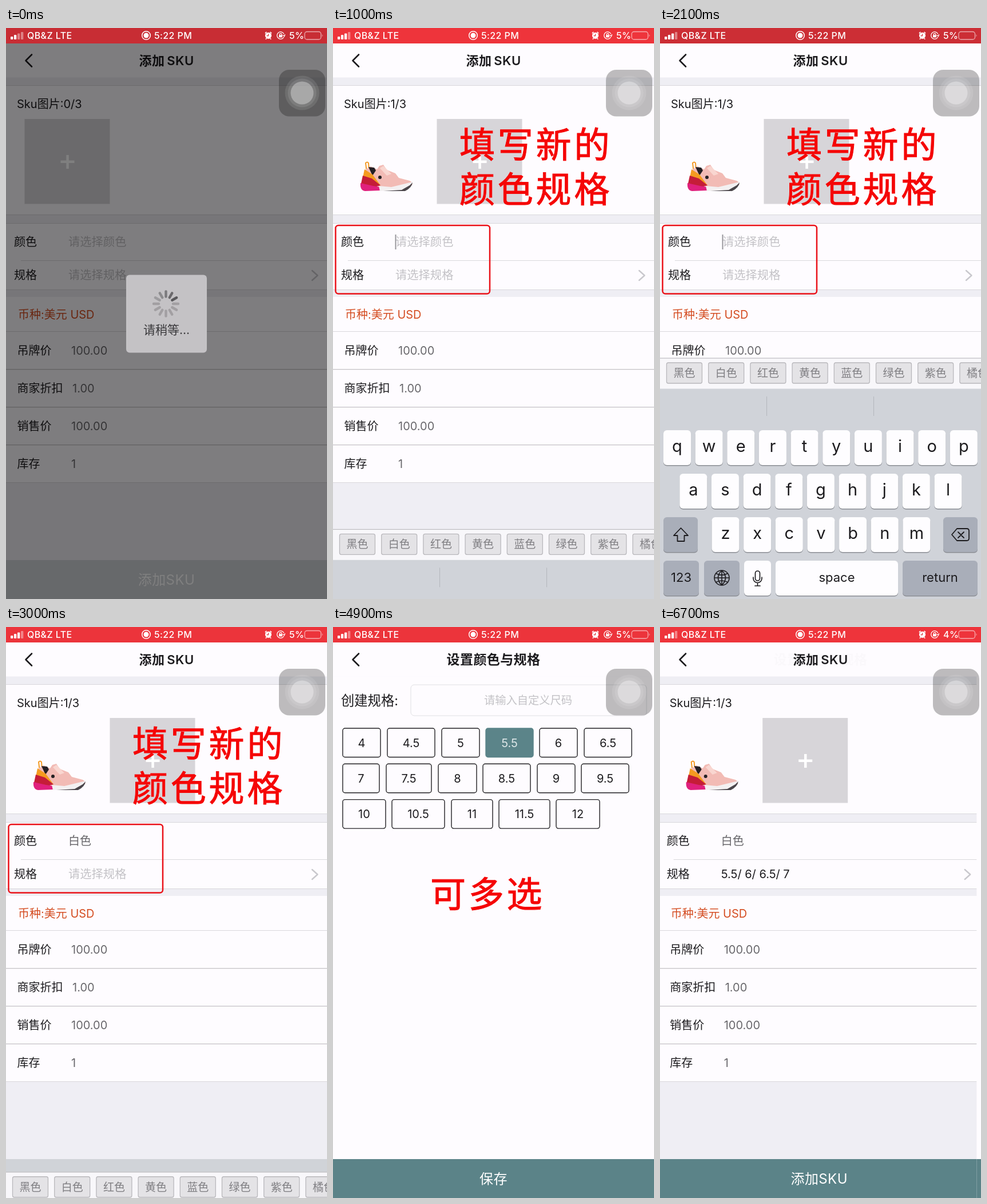
Recreate the animation shown at these times as an HTML page. Size 561x998 px, loop 6800 ms.

```html
<!DOCTYPE html>
<html lang="zh-CN">
<head>
<meta charset="utf-8">
<title>SKU</title>
<style>
html, body { margin: 0; width: 100%; height: 100%; overflow: hidden; background: #fefcff; }
svg { display: block; width: 561px; height: 998px; }
text { font-family: Inter, "Noto Sans CJK SC", "Noto Sans CJK", "Noto Sans", sans-serif; font-size: 20px; fill: #1c1b1e; white-space: pre; }
.mid { text-anchor: middle; }
.hint { fill: #c3c2c6; font-size: 20.3px; }
.val { fill: #68676b; }
.title { font-size: 23px; font-weight: 600; text-anchor: middle; letter-spacing: .4px; }
#titleForm { font-size: 22px; }
.cta { font-size: 24px; fill: #fff; text-anchor: middle; letter-spacing: .4px; }
.bar text { fill: #fff; font-size: 16px; font-weight: 500; letter-spacing: .4px; }
.note text { fill: #f50606; stroke: #f50606; stroke-width: 1; font-size: 62px; font-weight: 500; letter-spacing: 4.8px; }
.key { font-size: 29px; text-anchor: middle; }
.word { font-size: 22px; text-anchor: middle; }
.tag { font-size: 19px; fill: #7f7e82; font-weight: 500; text-anchor: middle; }
.size rect { fill: #fefcff; stroke: #222124; stroke-width: 1.4; }
.size.on rect { fill: #5b8489; stroke: #5b8489; }
.size.on text { fill: #dfe8e9; }
.line { fill: none; stroke-linecap: round; stroke-linejoin: round; }
</style>
</head>
<body>
<svg id="stage" viewBox="0 0 561 998">
  <g id="form"></g>
  <g id="sizes"></g>

  <g id="nav">
    <rect y="26" width="561" height="60.5" fill="#fefcff"/>
    <path class="line" d="M45 46.500L34.500 57L45 67.500" stroke="#1c1b1e" stroke-width="2.600"/>
    <text id="titleForm" class="title" x="280.500" y="65">添加&#8201;SKU</text>
    <text id="titleSizes" class="title" x="280.500" y="65">设置颜色与规格</text>
  </g>

  <g id="keyboard"></g>

  <g id="noteForm" class="note">
    <text x="221" y="226.500">填写新的</text>
    <text x="221" y="304.500">颜色规格</text>
    <rect x="4.500" y="345" width="269.500" height="119.500" rx="5" fill="none" stroke="#ea1219" stroke-width="2.500"/>
  </g>
  <g id="noteSizes" class="note"><text x="170" y="490">可多选</text></g>

  <g id="wait">
    <rect y="27" width="561" height="971" fill="#000" opacity=".5"/>
    <g id="loader">
      <rect x="210" y="431.500" width="141" height="136" rx="6" fill="#c4c2c5"/>
      <g id="spokes"></g>
      <text class="mid" x="280.500" y="535" style="font-size:21px;fill:#39383b">请稍等...</text>
    </g>
  </g>

  <g id="assist">
    <rect x="477" y="73" width="81" height="81.500" rx="18" opacity=".26"/>
    <g fill="#fff">
      <circle cx="517.500" cy="113.500" r="30" opacity=".1"/>
      <circle cx="517.500" cy="113.500" r="25" opacity=".1"/>
      <circle cx="517.500" cy="113.500" r="20" opacity=".33"/>
    </g>
  </g>

  <g class="bar">
    <rect id="barFill" width="561" height="27"/>
    <g id="signal" fill="#fff"></g>
    <text x="37" y="19">QB&amp;Z LTE</text>
    <circle cx="245" cy="13" r="7.300" fill="none" stroke="#fff" stroke-width="1.500"/>
    <circle cx="245" cy="13" r="4.500" fill="#fff"/>
    <text x="259" y="19">5:22 PM</text>
    <g class="line" stroke="#fff" stroke-width="1.600">
      <circle cx="458.500" cy="13.300" r="4.800" fill="#fff"/>
      <path d="M453.300 8.800l1.600-1.400M463.700 8.800l-1.600-1.400M455 18.500l-.8.800M462 18.500l.8.800"/>
      <path d="M458.500 10.500v3.200h-2.500" stroke="#d8323a" stroke-width="1.200"/>
      <path d="M485.500 10A6.300 6.300 0 1 0 485.500 16M484 12.500l2.500 2l1-3" stroke-width="1.300"/>
      <path d="M478.300 12.500v-1.500a1.700 1.700 0 0 1 3.400 0v1.500" stroke-width="1.200"/>
    </g>
    <rect x="477" y="12.200" width="6" height="4.300" rx=".8" fill="#fff"/>
    <text id="charge" x="495" y="19"></text>
    <rect x="522" y="6.500" width="28.500" height="13.500" rx="4" fill="none" stroke="#fff" stroke-opacity=".6" stroke-width="1.300"/>
    <path d="M552.500 11q2 2.200 0 4.500z" fill="#fff" opacity=".6"/>
  </g>
</svg>

<script>
const LOOP = 6800, TRAVEL = 421;
const $ = id => document.getElementById(id);
const rect = (x, y, w, h, fill, more = '') =>
  `<rect x="${x}" y="${y}" width="${w}" height="${h}" fill="${fill}" ${more}/>`;
const text = (x, y, s, cls = '', more = '') => `<text x="${x}" y="${y}" class="${cls}" ${more}>${s}</text>`;
const path = (d, stroke, w, more = '') =>
  `<path class="line" d="${d}" stroke="${stroke}" stroke-width="${w}" ${more}/>`;

function buildForm() {
  const white = '#fefcff';
  let s = rect(0, 27, 561, 971, '#efeef4');
  for (const [top, bottom] of [[100, 327], [341, 458], [470, 795]]) s += rect(0, top, 561, bottom - top, white);
  for (const y of [100, 326, 341, 457, 530, 794]) s += rect(0, y, 561, 1, '#d9d8dc');
  for (const y of [596, 662, 728]) s += rect(0, y, 561, 1.3, '#c5c4c8');
  s += rect(26, 406, 535, 1, '#d9d8dc');
  s += text(19, 140, '', '', 'id="count"');
  s += `<g id="shoe">
    <path d="M59 252l-2-16q3-3 5 0l1 12" fill="none" stroke="#f39a25" stroke-width="2"/>
    <path d="M57 247l9-5 11 5 4-6 7-2 6 9 15 6 6 8 19 5q6 3 4 8l-36 6-48-9z" fill="#f2bbb5"/>
    <path d="M62 243l10 1 3 5-6 9z" fill="#242024"/>
    <path d="M55 247l14 9 14 19-12 1-19-14z" fill="#f59b20"/>
    <path d="M52 258l16 5 15 12-14 4-20-7z" fill="#c51d38"/>
    <path d="M48 271l22 5 14 2-2 6-26 1q-9-1-8-14z" fill="#e0217d"/>
    <path d="M80 276l22 2 37-9q-1 8-13 13l-44 3z" fill="#f3f0f1"/>
    <path d="M88 285l32-2 14-8 5-5q-1 9-13 15z" fill="#4a454a"/>
    <path d="M82 245l6-4 9 9 5 5-8 3z" fill="#f9d6d0"/>
    <circle cx="82" cy="261" r="3" fill="#242024"/>
  </g>`;
  s += `<g id="adder">${rect(32.5, 159, 149, 148.5, '#d7d5d9')}${rect(95.5, 231.5, 24, 4.5, '#fff')}${rect(105.3, 222, 4.5, 24, '#fff')}</g>`;
  s += text(14, 381, '颜色') + text(14, 439, '规格');
  s += text(109, 381, '', '', 'id="color"') + text(109, 439, '', '', 'id="spec"');
  s += rect(108.5, 361, 2, 26, '#98979c', 'id="caret"');
  s += path('M535 424L544.500 432.500L535 441', '#c9c8cd', 2.4);
  s += text(21, 508, '币种:美元 USD', '', 'style="fill:#d44c20"');
  [['吊牌价', 114, '100.00'], ['商家折扣', 116, '1.00'], ['销售价', 114, '100.00'], ['库存', 114, '1']]
    .forEach(([label, x, value], i) => {
      const y = 571 + 66 * i;
      s += text(19.5, y, label) + text(x, y, value, 'val');
    });
  s += rect(0, 930, 561, 68, '', 'id="addFill"') + text(280.5, 973, '添加SKU', 'cta');
  s += rect(0, 27, 561, 971, '#000', 'id="shade"');
  $('form').innerHTML = s;
}

function buildSizes() {
  let s = rect(0, 27, 561, 971, '#fefcff');
  s += text(14, 137, '创建规格:', '', 'style="font-size:23.300px"');
  s += rect(136, 101, 412, 54, 'none', 'rx="6" stroke="#e0dfe3"');
  s += text(341, 135, '请输入自定义尺码', 'hint mid', 'style="font-size:19.300px"');
  const rows = [
    [[4, 17, 66], [4.5, 95, 83], [5, 190, 66], [5.5, 267, 83], [6, 361, 66], [6.5, 439, 83]],
    [[7, 17, 64], [7.5, 93, 79], [8, 184, 67], [8.5, 262, 83], [9, 357, 66], [9.5, 434, 83]],
    [[10, 17, 75], [10.5, 103, 92], [11, 207, 72], [11.5, 290, 89], [12, 390, 76]]
  ];
  s += '<g id="choices">';
  rows.forEach((row, r) => row.forEach(([n, x, w]) => {
    const y = 177 + 62.3 * r;
    s += `<g class="size" data-size="${n}"><rect x="${x}" y="${y}" width="${w}" height="50.500" rx="4"/>${text(x + w / 2, y + 32.5, n, 'mid')}</g>`;
  }));
  s += '</g>' + rect(0, 930, 561, 68, '', 'id="saveFill"') + text(280.5, 973, '保存', 'cta');
  $('sizes').innerHTML = s;
}

function buildKeyboard() {
  const key = (x, y, w, label = '', cls = 'key', fill = '#fefdff') =>
    rect(x, y + 1.5, w, 61, '#8b8e94', 'rx="6"') + rect(x, y, w, 61, fill, 'rx="6"') +
    text(x + w / 2, y + (cls === 'key' ? 38 : 37), label, cls);
  const grey = '#a9aeb9', ink = '#1c1b1e';
  let s = rect(0, 577, 561, 54, '#f8f7fa') + rect(0, 576.5, 561, 1.2, '#bebdc1');
  [...'黑白红黄蓝绿紫橘'].forEach((c, i) => {
    const x = 11.5 + 73.2 * i;
    s += rect(x, 585, 62, 36, '#e4e3e6', 'rx="3" stroke="#b9b8bc" stroke-width="1.300"') + text(x + 31, 610, c + '色', 'tag');
  });
  s += rect(0, 630.5, 561, 368, '#d0d3d9');
  for (const x of [186, 373]) s += rect(x, 644, 1, 34, '#b3b6bc');
  [['qwertyuiop', 6], ['asdfghjkl', 34.3], ['zxcvbnm', 90.5]].forEach(([letters, left], r) =>
    [...letters].forEach((c, i) => { s += key(left + 55.65 * i, 703 + 76 * r, 48, c); }));
  s += key(6, 855, 60, '', '', grey) + key(495, 855, 60, '', '', grey);
  s += key(6, 931, 62, '123', 'word', grey) + key(77, 931, 62, '', '', grey) + key(147, 931, 47);
  s += key(202, 931, 214, 'space', 'word') + key(424, 931, 131, 'return', 'word', grey);
  s += path('M36.500 874l-12.500 13h6.500v10h12v-10h6.500z', ink, 1.8);
  s += path('M519 875h17q4 0 4 4v13q0 4-4 4h-17l-9-10.500zM521 881l10 10M531 881l-10 10', ink, 1.8);
  s += path('M95 961a13 13 0 1 0 26 0a13 13 0 1 0-26 0h26M108 948v26M108 948q-13 13 0 26M108 948q13 13 0 26M98 953.500q10 5 20 0M98 968.500q10-5 20 0', ink, 1.6);
  s += path('M166.500 953a4 4 0 0 1 8 0v9a4 4 0 0 1-8 0zM163 960v2a7.500 7.500 0 0 0 15 0v-2M170.500 970v5M166 975h9', ink, 1.7);
  $('keyboard').innerHTML = s;
}

function buildDetails() {
  $('signal').innerHTML = [5, 8, 10.5, 13].map((h, i) => rect(8 + 6 * i, 20 - h, 4.3, h, '#fff', 'rx="1"')).join('');
  for (let i = 0; i < 12; i++)
    $('spokes').innerHTML += path('M279.500 469.500V460.500', '#59585b', 4.4, `transform="rotate(${30 * i} 279.500 482)"`);
}

const show = (id, on) => { $(id).style.display = on ? '' : 'none'; };
const put = (id, s, cls = '') => { $(id).textContent = s; $(id).setAttribute('class', cls); };
const move = (id, x, y = 0) => $(id).setAttribute('transform', `translate(${x} ${y})`);
const paint = (id, on) => $(id).setAttribute('fill', on ? '#5b8388' : '#d0d3d8');

// Critically damped spring, 0 to 1
function spring(ms) {
  const x = Math.max(0, ms) * .0157;
  return 1 - (1 + x) * Math.exp(-x);
}

const picks = { 5.5: 4600, 6: 5000, 6.5: 5300, 7: 5600 };

function render(t) {
  const loaded = t >= 500, colored = t >= 2700, back = t > 6300;

  const glow = (1 - Math.cos(t / 1900 * 2 * Math.PI)) / 2;
  const mix = (a, b) => Math.round(a + (b - a) * glow);
  $('barFill').setAttribute('fill', `rgb(${mix(200, 238)},${mix(45, 52)},${mix(52, 59)})`);
  [...$('signal').children].forEach((b, i) => b.setAttribute('opacity', i < (loaded ? 3 : 2) ? 1 : .4));
  put('charge', t < 5900 ? '5%' : '4%');

  show('wait', t < 700);
  show('loader', !loaded);
  $('wait').setAttribute('opacity', loaded ? Math.max(0, 1 - (t - 400) / 300) : 1);
  [...$('spokes').children].forEach((spoke, i) => {
    const age = (2 - i + Math.floor(t / 83) + 120) % 12;
    spoke.setAttribute('opacity', Math.max(.32, 1 - age * .16));
  });

  put('count', `Sku图片:${loaded ? 1 : 0}/3`);
  show('shoe', loaded);
  move('adder', loaded ? 149 : 0);
  put('color', colored ? '白色' : '请选择颜色', colored ? 'val' : 'hint');
  put('spec', back ? '5.5/ 6/ 6.5/ 7' : '请选择规格', back ? '' : 'hint');
  show('caret', t >= 900 && !colored);
  paint('addFill', back);

  const raised = spring(t - 932) - spring(t - 2758);
  move('keyboard', 0, TRAVEL * (1 - raised));
  show('keyboard', t > 932 && t < 3300);

  const pushed = spring(t - 3290) - spring(t - 6300);
  move('form', -168 * pushed);
  move('sizes', 561 * (1 - pushed));
  $('shade').setAttribute('opacity', .1 * pushed);
  $('titleForm').setAttribute('opacity', 1 - pushed);
  $('titleSizes').setAttribute('opacity', pushed);

  show('choices', t >= 4200);
  document.querySelectorAll('.size').forEach(g => g.classList.toggle('on', t >= picks[g.dataset.size]));
  paint('saveFill', t >= picks[5.5]);
  show('noteForm', t >= 600 && t < 3300);
  show('noteSizes', t >= 4300 && !back);
}

buildForm();
buildSizes();
buildKeyboard();
buildDetails();

function tick() {
  render(Math.floor(performance.now() % LOOP / 100) * 100);
  requestAnimationFrame(tick);
}
tick();
</script>
</body>
</html>
```
